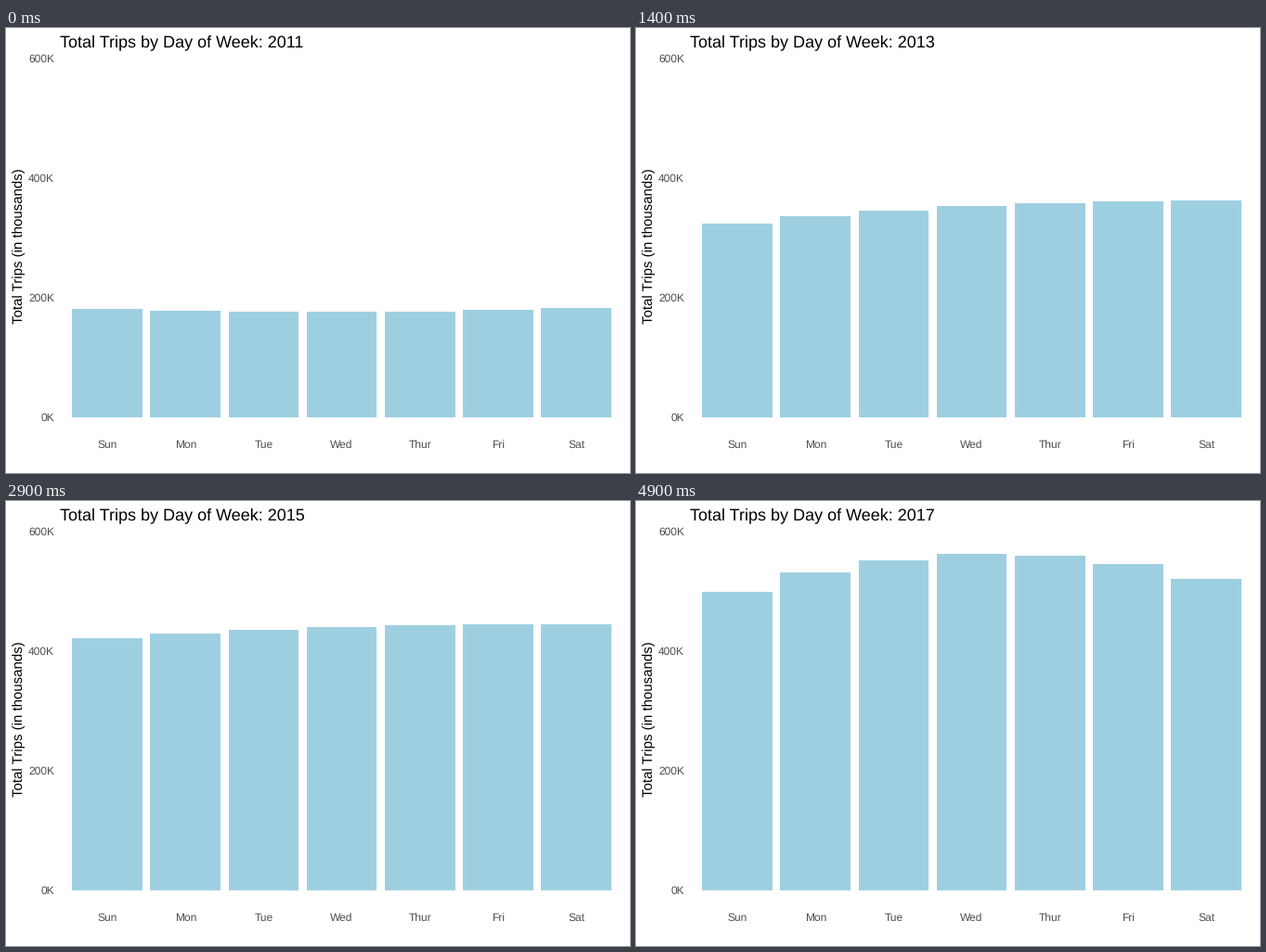
A matplotlib script that plays this animation: 672x480 px, repeating every 5 s.

```python
import matplotlib.pyplot as plt
import numpy as np
from matplotlib.animation import FuncAnimation
from matplotlib.patches import Rectangle

plt.rcParams["font.family"] = "Liberation Sans"
plt.rcParams["text.hinting"] = "none"

WIDTH, HEIGHT = 672, 480
FRAMES = 50
LAST = FRAMES - 1
BASELINE = 420
PX_PER_THOUSAND = 129 / 200
FIRST_CENTER, SPACING, BAR_WIDTH = 109, 84.2, 75.7
DAYS = ["Sun", "Mon", "Tue", "Wed", "Thur", "Fri", "Sat"]
FIRST_YEAR = 2011

# Each year's week is a parabola: mean, slope and bend, in thousands of trips.
MEAN = [179, 294, 367, 418, 456, 478, 539]
SLOPE = [0.2, 6.4, 6.5, 5.2, 2.6, 5.4, 3.7]
BEND = [0.6, -2.2, -0.7, 2.6, -4.0, -8.1, -5.8]
STEPS = len(MEAN) - 1
KEY_FRAMES = [int(LAST * k / STEPS + 0.5) for k in range(STEPS + 1)]

fig = plt.figure(figsize=(WIDTH / 72, HEIGHT / 72), dpi=72, facecolor="white")
ax = fig.add_axes([0, 0, 1, 1])
ax.set(xlim=(0, WIDTH), ylim=(HEIGHT, 0))
ax.axis("off")


def label(x, y, text, size=12, color="#4d4d4d", **kwargs):
    return ax.text(x, y, text, fontsize=size, color=color,
                   va="baseline", **kwargs)


def trips(frame, day):
    mean, slope, bend = (np.interp(frame, KEY_FRAMES, values)
                         for values in (MEAN, SLOPE, BEND))
    x = day - 3
    return mean + slope * x + bend * (x * x - 4)


title = label(58.5, 20, "", 18, "black", ha="left")
label(18, 235, "Total Trips (in thousands)", 15, "black", rotation=90,
      rotation_mode="anchor", ha="center")
for thousands in range(0, 601, 200):
    label(52, BASELINE + 4.2 - thousands * PX_PER_THOUSAND, f"{thousands}K",
          ha="right")

bars = []
for i, day in enumerate(DAYS):
    center = FIRST_CENTER + i * SPACING
    label(center, 453.2, day, ha="center")
    bar = Rectangle((center - BAR_WIDTH / 2, BASELINE), BAR_WIDTH, 0,
                    facecolor="#9ecfe0", linewidth=0, antialiased=False)
    bars.append(ax.add_patch(bar))


def update(frame):
    year = FIRST_YEAR + round(STEPS * frame / LAST)
    title.set_text(f"Total Trips by Day of Week: {year}")
    for day, bar in enumerate(bars):
        bar.set_height(-trips(frame, day) * PX_PER_THOUSAND)
    return [title, *bars]


anim = FuncAnimation(fig, update, frames=FRAMES, interval=100,
                     repeat=True, repeat_delay=0)
plt.show()
```
